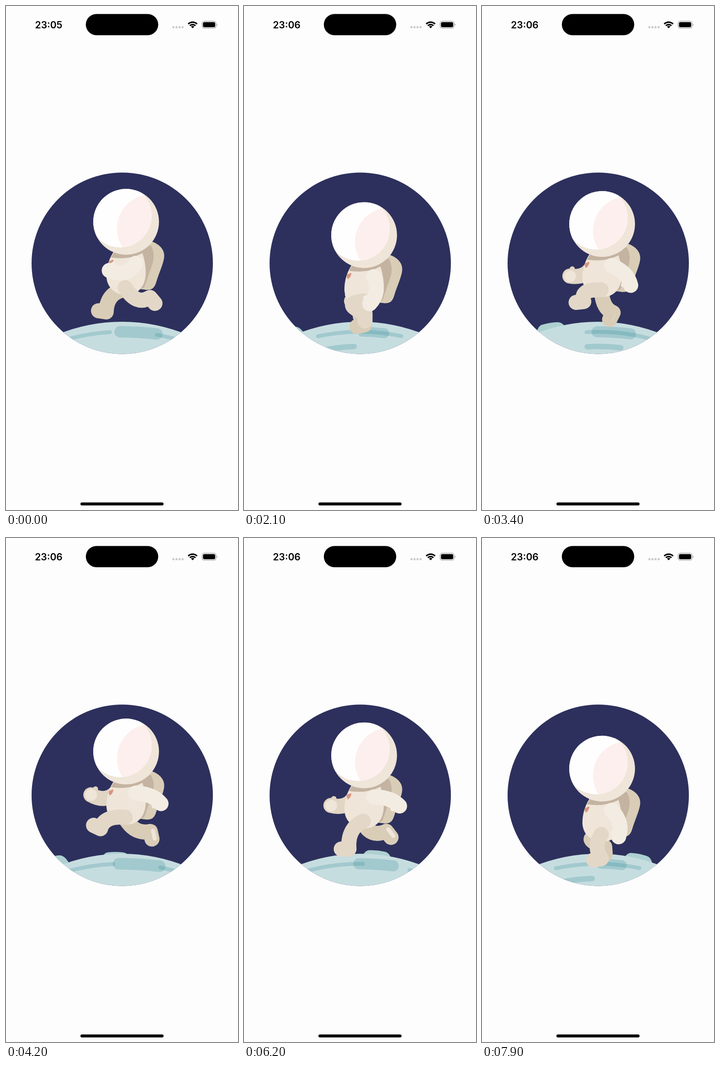
Recreate the animation shown at these times as an HTML page. Size 508 by 1103 pixels, loop 8 s.

```html
<!DOCTYPE html>
<html lang="en">
<head>
<meta charset="utf-8">
<title>Moon run</title>
<style>
  html, body { margin: 0; width: 100%; height: 100%; overflow: hidden; background: #fdfdfd; }
  svg { display: block; width: 100%; height: 100%; }
  #clock { font: 600 21px Inter, Roboto, sans-serif; text-anchor: middle; }
  .limb { fill: none; stroke-width: 33; stroke-linecap: round; stroke-linejoin: round; }
  .mark { fill: none; stroke: #2e8b92; stroke-opacity: .24; stroke-linecap: round; }
</style>
</head>
<body>
<svg viewBox="0 0 508 1103">
  <defs>
    <clipPath id="window"><circle cx="254.5" cy="563" r="198.5"/></clipPath>
    <clipPath id="helmetClip"><circle cx="263" r="72"/></clipPath>
    <clipPath id="visorClip"><circle cx="250" cy="-13" r="69"/></clipPath>
    <path id="bumpShape" d="M198 712C203 692 209 682 219 682Q235 680 251 682C261 683 267 692 272 712Z" fill="#aed0d1"/>
  </defs>

  <text id="clock" x="93.5" y="48.7"></text>
  <rect x="174.8" y="17.4" width="158.5" height="46.5" rx="23.2"/>
  <g id="signal" fill="#c9c9c9"></g>
  <g fill="none" stroke="#000" stroke-width="3.2">
    <path d="M399 39.5A13.6 13.6 0 0 1 418.4 39.5"/>
    <path d="M402.6 43.2A8.5 8.5 0 0 1 414.8 43.2"/>
  </g>
  <path d="M408.7 48.8L405 45Q408.7 42 412.4 45Z"/>
  <rect x="429.3" y="33.2" width="30.8" height="15.4" rx="4.8" fill="none" stroke="#a4a4a4" stroke-width="1.3"/>
  <rect x="431.3" y="35.2" width="26.8" height="11.4" rx="3.3"/>
  <path d="M461.7 38.5Q465 41 461.7 43.5Z" fill="#a4a4a4"/>
  <rect x="163" y="1086.6" width="182" height="6.4" rx="3.2"/>

  <g clip-path="url(#window)">
    <rect x="50" y="360" width="410" height="410" fill="#2d305c"/>
    <use id="lowBump" href="#bumpShape"/>
    <use id="highBump" href="#bumpShape"/>
    <circle cx="254" cy="1066" r="375" fill="#c6dde0"/>
    <path id="shadow" class="mark"/>
    <g id="strips"></g>

    <g id="runner">
      <path id="farArm" class="limb" stroke="#e1d5c4"/>
      <circle id="farThumb" r="5.7" fill="#e1d5c4"/>
      <circle id="palm" r="13" fill="#efe5d9"/>
      <path d="M316 42C339 49 349 64 346 80C343 96 336 109 329 132C325 145 320 149 308 149L292 147V47Z" fill="#d9cdb7"/>
      <path d="M296 57L317 51C324 64 325 76 321 91L304 140Q301 147 294 146L276 120Z" fill="#c3b3a0"/>
      <path id="farLeg" class="limb" stroke="#d9cdb7"/>
      <path id="sole" fill="none" stroke="#efe5d9" stroke-linecap="round"/>
      <path d="M238 62C225 80 219 102 220 122C222 144 239 160 263 160C290 160 306 140 306 111C306 94 302 78 298 66Z" fill="#efe5d9"/>
      <path d="M241 60L229.5 78Q269 84 298 69L304 55Z" fill="#c3b3a0"/>
      <path d="M227 95C223 90 225 84 230 85C233 81 237 83 234 88C233 92 230 95 226 97Z" fill="#d89580"/>
      <path id="nearLeg" class="limb" stroke="#e3d7c7"/>
      <path id="nearArm" class="limb" stroke="#f3ece2"/>
      <circle id="nearThumb" r="5.3" fill="#f3ece2"/>
      <circle cx="263" r="72" fill="#efe5d9"/>
      <g clip-path="url(#helmetClip)">
        <circle cx="250" cy="-13" r="69" fill="#fefefe"/>
        <circle cx="318" cy="15" r="75" fill="#fdefed" clip-path="url(#visorClip)"/>
      </g>
    </g>
  </g>
</svg>
<script>
const LOOP = 8000;
const STEP = 5950;          // one stride; a full left-right cycle is two
const LEG_START = 2100;     // near leg passes under the body
const STRIP_GAP = 37.4;     // degrees between ground strips

const $ = id => document.getElementById(id);
const set = (id, attrs) => {
  for (const name in attrs) $(id).setAttribute(name, attrs[name]);
};
const clamp = (x, lo, hi) => Math.min(Math.max(x, lo), hi);
const smooth = x => x * x * (3 - 2 * x);
const wrap = x => x - Math.floor(x);

// Angles are in degrees from straight down, positive towards the back.
function polar([x, y], length, degrees) {
  const a = degrees * Math.PI / 180;
  return [x + length * Math.sin(a), y + length * Math.cos(a)];
}

// Key poses shared by both legs: phase, knee x y, ankle x y, toe angle.
const STRIDE = [
  [0, 212, 150, 265, 171, 0],         // pass
  [.176, 214, 140, 207, 169, -116],   // reach
  [.286, 212, 144, 203, 177, -116],   // float
  [.345, 226, 160, 230, 205, -90],    // land
  [.487, 243, 170, 261, 197, -80],    // stand
  [.609, 264, 185, 287, 194, -27],    // push
  [.676, 282, 182, 316, 175, 12],     // kick
  [.786, 292, 187, 318, 165, 42]      // trail
];

function legPose(phase) {
  const count = STRIDE.length;
  const row = i => {
    const [at, ...values] = STRIDE[(i + count) % count];
    return [at + Math.floor(i / count), ...values];
  };
  let i = count - 1;
  while (STRIDE[i][0] > phase) i--;
  const slope = (j, c) => (row(j + 1)[c] - row(j)[c]) / (row(j + 1)[0] - row(j)[0]);
  const tangent = (j, c) => {
    const a = slope(j - 1, c), b = slope(j, c);
    return a * b <= 0 ? 0 : 2 * a * b / (a + b);
  };
  const span = row(i + 1)[0] - row(i)[0];
  const u = (phase - row(i)[0]) / span, v = 1 - u;
  const value = c => row(i)[c] + (row(i + 1)[c] - row(i)[c]) * smooth(u)
    + span * u * v * (v * tangent(i, c) - u * tangent(i + 1, c));
  const ankle = [value(3), value(4)];
  return { knee: [value(1), value(2)], ankle, toe: polar(ankle, 17, value(5)) };
}

function drawLeg(side, hip, { knee, ankle, toe }) {
  set(side + 'Leg', { d: `M${hip}Q${knee} ${ankle}L${toe}` });
}

function drawSole({ ankle, toe }) {
  const ux = (toe[0] - ankle[0]) / 17, uy = (toe[1] - ankle[1]) / 17;
  const x = (ankle[0] + toe[0]) / 2 + uy * 6, y = (ankle[1] + toe[1]) / 2 - ux * 6;
  const width = clamp((toe[0] - 275) / 4.5, 0, 9);
  set('sole', {
    d: `M${x - ux * 9} ${y - uy * 9}L${x + ux * 9} ${y + uy * 9}`,
    'stroke-width': width
  });
}

function drawArm(side, shoulder, swing) {
  const elbow = polar(shoulder, 38, 30 + 0.85 * swing);
  const hand = polar(shoulder, 60, swing);
  const thumb = polar(polar(hand, -12, swing), 11, swing - 90);
  set(side + 'Arm', { d: `M${shoulder}Q${elbow} ${hand}` });
  set(side + 'Thumb', { cx: thumb[0], cy: thumb[1] });
  return hand;
}

function arc(radius, from, to) {
  const point = deg => polar([254, 1153], -radius, -deg);
  return `M${point(from)}A${radius} ${radius} 0 0 1 ${point(to)}`;
}

// Every second strip carries its lower companion further along.
const strips = [-1, 0, 1, 2].map(index => {
  const group = document.createElementNS('http://www.w3.org/2000/svg', 'g');
  const lower = index % 2 ? arc(408, 6.6, 15.7) : arc(408, 0, 10.3);
  group.innerHTML = `<path class="mark" stroke-width="8.5" d="${arc(440, 0, 24)}"/>
    <path class="mark" stroke-width="12" d="${lower}"/>`;
  $('strips').append(group);
  return { group, index };
});

for (let i = 0; i < 4; i++) {
  $('signal').innerHTML += `<circle cx="${366.6 + 6.7 * i}" cy="46.5" r="2.4"/>`;
}

// Strides of ground covered: the planet turns in flight and rests in between.
function travel(t) {
  const strides = (t - 2300) / STEP, whole = Math.floor(strides);
  return whole + smooth(Math.min((strides - whole) * STEP / 5150, 1));
}

function drawGround(t, drop) {
  const turned = travel(t);
  const spin = 2 * STRIP_GAP * turned - 12.1;
  for (const { group, index } of strips) {
    group.setAttribute('transform', `rotate(${spin - index * STRIP_GAP} 254 1153)`);
  }
  set('lowBump', { transform: `rotate(${49 * turned - 14.5} 235 1251) translate(0 6)` });
  set('highBump', { transform: `rotate(${36 * turned - 24.9} 235 1251)` });

  const grow = 56 * (1 - drop) ** 1.6, width = 67 + grow;
  const thick = 16 + width / 12, reach = (width - thick) / 2, x = 283 + 0.18 * grow;
  set('shadow', {
    d: `M${x - reach} 713Q${x} 713 ${x + reach} ${713 + width / 22}`,
    'stroke-width': thick
  });
}

function drawRunner(t, drop) {
  set('runner', { transform: `translate(0 ${463.5 + 43 * drop})` });

  const swing = start => Math.sin(Math.PI * (t - start) / STEP);
  const farHand = drawArm('far', [245, 85], -86 * swing(1900));
  set('palm', { cx: farHand[0] + 0.5, cy: farHand[1] + 0.5 });
  drawArm('near', [284, 91], 80 * swing(2300));

  const phase = (t - LEG_START) / (2 * STEP);
  const farPose = legPose(wrap(phase + 0.5));
  drawLeg('far', [262, 148], farPose);
  drawSole(farPose);
  drawLeg('near', [261, 144], legPose(wrap(phase)));
}

function draw(t) {
  $('clock').textContent = t < 2000 ? '23:05' : '23:06';
  // 0 at the top of the bounce, 1 at the bottom.
  const drop = Math.abs(2 * wrap((t - 4850) / STEP + 0.5) - 1) ** 1.6;
  drawGround(t, drop);
  drawRunner(t, drop);
}

const start = performance.now();
function tick() {
  draw((performance.now() - start) % LOOP);
  requestAnimationFrame(tick);
}
tick();
</script>
</body>
</html>
```
